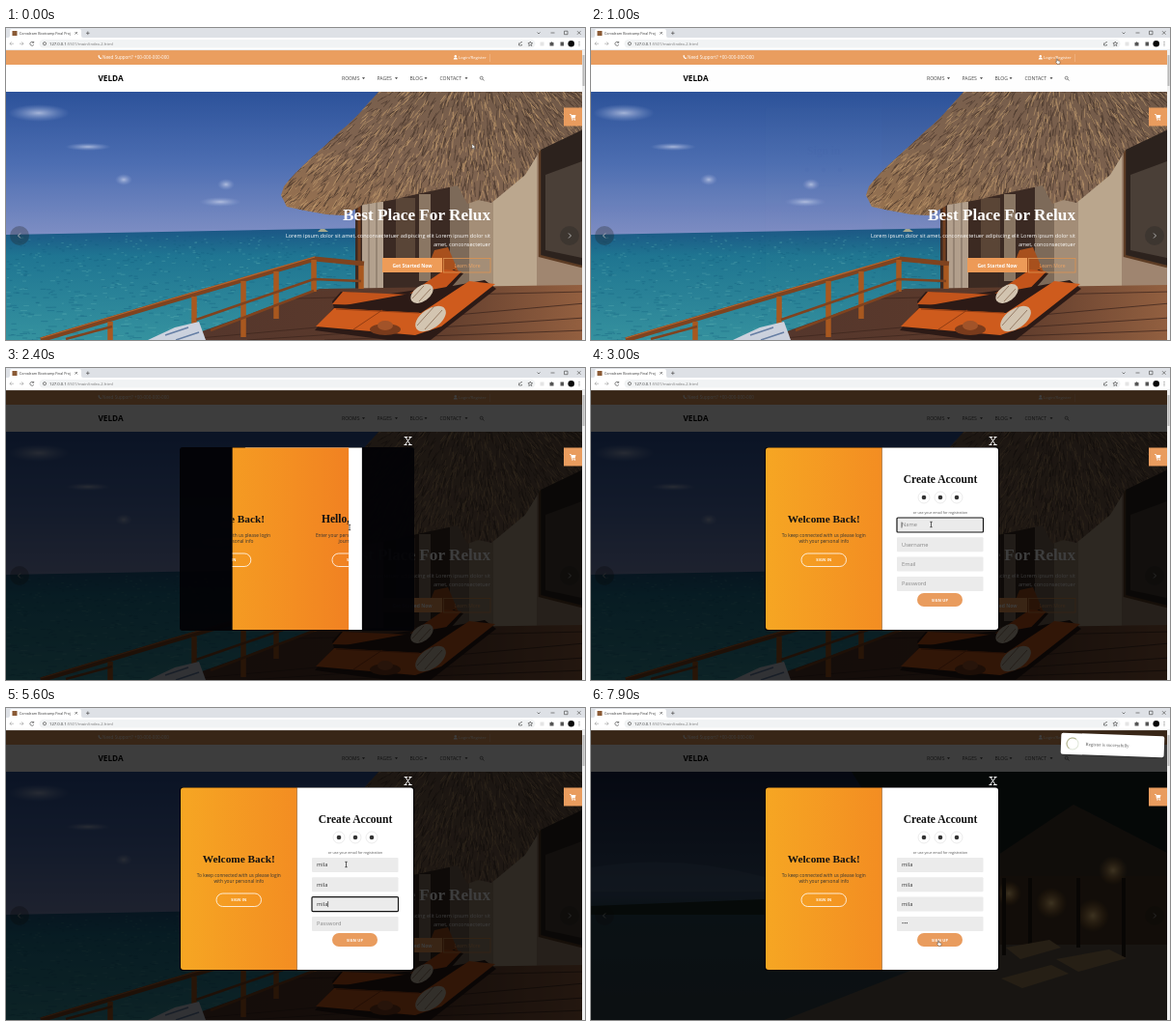
An HTML page that plays this animation: 600 px wide and 323 px high, repeating every 8 s.

```html
<!DOCTYPE html>
<html lang="en">
<head>
<meta charset="utf-8">
<title>Hotel sign-up</title>
<style>
html, body { margin: 0; width: 100%; height: 100%; overflow: hidden; background: #fff }
svg { display: block; width: 600px; height: 323px }
text { font-family: "Open Sans", Arial, sans-serif; font-size: 5px; fill: #333 }
.serif { font-family: "Liberation Serif", Times, serif; font-weight: 700 }
.mid { text-anchor: middle }
.end { text-anchor: end }
.w { fill: #fff }
.h { font-size: 11.6px; fill: #111 }
.nav { font-size: 5.1px; fill: #444 }
.lead { font-size: 5.55px }
.note { font-size: 4.8px }
.small { font-size: 3.7px; fill: #555 }
.btn { font-size: 3.9px; font-weight: 700; letter-spacing: .2px; fill: #fff; text-anchor: middle }
.line { fill: none; stroke: #555; stroke-width: .7 }
.in { font-size: 5.7px; fill: #333 }
.hint { fill: #888 }
</style>
</head>
<body>
<svg viewBox="0 0 600 323">
<defs>
  <linearGradient id="sky" x2="0" y2="1"><stop stop-color="#2c529a"/><stop offset=".5" stop-color="#4d6eb2"/><stop offset="1" stop-color="#7f8fc4"/></linearGradient>
  <linearGradient id="sea" x2="0" y2="1"><stop stop-color="#1b5585"/><stop offset=".25" stop-color="#1f7592"/><stop offset="1" stop-color="#35929f"/></linearGradient>
  <linearGradient id="straw" x1="1" x2="0" y2="1"><stop stop-color="#6f5847"/><stop offset=".6" stop-color="#806450"/><stop offset="1" stop-color="#9a7350"/></linearGradient>
  <linearGradient id="deck"><stop stop-color="#54362c"/><stop offset=".6" stop-color="#5c3a2b"/><stop offset="1" stop-color="#946040"/></linearGradient>
  <linearGradient id="dusk" x2="0" y2="1"><stop stop-color="#18254a"/><stop offset=".5" stop-color="#3c5675"/><stop offset=".56" stop-color="#2b4858"/><stop offset="1" stop-color="#33434a"/></linearGradient>
  <linearGradient id="orange"><stop stop-color="#f6a623"/><stop offset=".5" stop-color="#f38d22"/><stop offset="1" stop-color="#ee7322"/></linearGradient>
  <radialGradient id="lamp"><stop stop-color="#ffd68a"/><stop offset="1" stop-color="#c78236" stop-opacity="0"/></radialGradient>
  <radialGradient id="cloud"><stop stop-color="#cbd3ea"/><stop offset="1" stop-color="#8fa3d2" stop-opacity="0"/></radialGradient>
  <clipPath id="hero"><path d="M0 66H597V323H0Z"/></clipPath>
  <clipPath id="roofClip"><path id="roof" d="M386 66C372 82 360 96 346 107C326 127 304 143 288 164L285 173L291 185L310 189L332 193L350 194L370 183L400 178L430 171L468 163L478 182L490 178L503 181L520 167L538 152L554 126L598 105V66Z"/></clipPath>
  <clipPath id="box"><rect x="181" y="82.500" width="241" height="188.500" rx="3"/></clipPath>
  <clipPath id="window"><rect id="slot" y="82" width="120.500" height="190"/></clipPath>
</defs>

<g clip-path="url(#hero)">
  <rect y="66" width="600" height="150" fill="url(#sky)"/>
  <g fill="url(#cloud)" opacity=".75"><ellipse cx="34" cy="88" rx="32" ry="9"/><ellipse cx="85" cy="123" rx="24" ry="4"/><ellipse cx="122" cy="157" rx="9" ry="6"/><ellipse cx="228" cy="162" rx="9" ry="6"/><ellipse cx="222" cy="180" rx="22" ry="5"/></g>
  <path d="M0 214L380 207V323H0Z" fill="url(#sea)"/>
  <g fill="none" stroke-width=".7" opacity=".5"><path id="wave1" stroke="#115a7c"/><path id="wave2" stroke="#5cb0b4"/></g>
  <path d="M323 211l3-3h4l4 3z" fill="#a5a88f"/>
  <path d="M362 150H600V280H362Z" fill="#3b2a23"/>
  <path d="M369 180H391V270H369Z" fill="#b3a18e"/>
  <path d="M376 180v90M384 180v90" stroke="#8d7c6c" stroke-width="1.500"/>
  <path d="M404 176h20v70h-20z" fill="#594537"/>
  <path d="M428 172H440V262H428Z" fill="#8a7663"/>
  <path d="M460 160H480V268H460Z" fill="#7d6a59"/>
  <path d="M480 145L556 120V276H480Z" fill="#a48e77"/>
  <path d="M505 155L553 130V278H505Z" fill="#bba78e"/>
  <path d="M550 120L600 92V300H550Z" fill="#a08670"/>
  <path d="M553 124L597 104V247L553 236Z" fill="#2c221d"/>
  <path d="M559 152L597 138V238L559 230Z" fill="#4a3f37"/>
  <path d="M553 124V236L597 247" stroke="#5e3d25" stroke-width="2.500" fill="none"/>
  <path d="M366 185v58" stroke="#713f20" stroke-width="3"/>
  <path d="M178 323L325 270L600 266V323Z" fill="url(#deck)"/>
  <path d="M178 323L600 285M250 323L600 300M330 323L600 313M300 280L600 273" stroke="#3f271f" stroke-width=".8"/>
  <use href="#roof" fill="url(#straw)"/>
  <g clip-path="url(#roofClip)" fill="none" stroke-width=".6"><path id="straw1" stroke="#46342a"/><path id="straw2" stroke="#c19a6d"/></g>
  <g fill="none" stroke="#7f431f">
    <path d="M36 323L166 284L320 239L371 244" stroke-width="5"/>
    <path d="M36 321L166 282L320 237" stroke="#b5652f" stroke-width="1.300"/>
    <path d="M108 304v19M195 278v34M246 262v58M280 252v49M319 240v33M368 246v24" stroke="#a9581f" stroke-width="5.500"/>
    <path d="M197 302L319 260L368 262M212 313L319 272M62 322L110 309" stroke-width="2.500"/>
  </g>
  <path d="M147 323l28-13 25-6 7 19z" fill="#ccd2de"/>
  <path d="M165 318l24-8M176 323l24-8" stroke="#667fa5" stroke-width="1.500"/>
  <path d="M436 250l8-20 14-3 12 28z" fill="#a8501d"/>
  <path d="M347 273L392 276L433 270L464 250L474 254L440 293L340 290L338 283Z" fill="#2c1a16"/>
  <path d="M349 273L417 276L455 250L472 252L436 289L338 286Z" fill="#c4541b"/>
  <path d="M340 289L320 313L395 323H440L508 270L496 261Z" fill="#2c1a16"/>
  <path d="M340 290L430 295L480 262L507 265L451 309L424 318L321 309Z" fill="#cf5b1d"/>
  <path d="M342 291l86 4M390 292l-30 20" stroke="#933d13" fill="none"/>
  <g fill="#d3c5b1"><ellipse cx="431" cy="275" rx="13" ry="8" transform="rotate(-35 431 275)"/><ellipse cx="440" cy="301" rx="18" ry="10" transform="rotate(-35 440 301)"/></g>
  <path d="M421 280l12-13M428 283l12-13M426 308l18-20M434 312l18-20" stroke="#987d66"/>
  <ellipse cx="393" cy="312" rx="16" ry="6" fill="#7a3b1c"/><ellipse cx="393" cy="308" rx="8" ry="5" fill="#a25329"/>
  <g id="copy">
    <text class="serif w end" x="502" y="199" style="font-size:17.200px">Best Place For Relux</text>
    <text class="lead w end" x="502" y="216.500">Lorem ipsum dolor sit amet, conconsectetuer adipiscing elit Lorem ipsum dolor sit</text>
    <text class="lead w end" x="502" y="225.500">amet, conconsectetuer</text>
    <rect x="390" y="238" width="62" height="15" fill="#ee9c58"/>
    <text class="w mid" x="421" y="247.500" font-weight="700">Get Started Now</text>
    <rect x="453.500" y="238.500" width="48.500" height="14.500" fill="none" stroke="#dc9352" stroke-width=".8"/>
    <text class="mid" x="478" y="247.500" style="fill:#eda566">Learn More</text>
  </g>
  <g id="night">
    <rect y="66" width="600" height="257" fill="url(#dusk)"/>
    <path d="M0 165Q90 150 180 175L300 190H0Z" fill="#62789a" opacity=".3"/>
    <path d="M0 205L180 198L300 214H0Z" fill="#182924"/>
    <path d="M270 66H597V240H380Z" fill="#17201f"/>
    <path d="M410 160L500 100L597 150V178L410 176Z" fill="#43382c"/>
    <path d="M422 174H597V250H422Z" fill="#4c3824"/>
    <path d="M200 323L400 245H597V323Z" fill="#645a4b"/>
    <g fill="url(#lamp)"><circle cx="433" cy="192" r="13"/><circle cx="477" cy="202" r="16"/><circle cx="541" cy="168" r="15"/><circle cx="520" cy="215" r="17"/></g>
    <path d="M428 176v80M455 176v72M505 176v72M552 176v82" stroke="#22180f" stroke-width="4"/>
    <path d="M430 248l45-8 12 8-42 12zM482 260l55-10 18 9-50 14zM425 280l52-14 18 9-48 15z" fill="#a18158"/>
  </g>
  <g fill="#222" opacity=".3"><circle cx="14" cy="215" r="10"/><circle cx="584" cy="215" r="10"/></g>
  <path d="M15 212.500l-2.500 2.500 2.500 2.500M583 212.500l2.500 2.500-2.500 2.500" fill="none" stroke="#ccc" stroke-width=".8"/>
</g>

<rect y="23" width="597" height="15" fill="#ea9e5f"/>
<path d="M95.500 28.500l1-.4.700 1.100-.5.600.9 1 .8-.4.700 1-.6.700c-1.500.2-3.200-1.900-3-3.600z" fill="#fff"/>
<text class="w" x="100" y="32.300" style="font-size:4.600px">Need Support? +00-000-000-000</text>
<circle cx="465.800" cy="29.300" r="1.200" fill="#fff"/><path d="M463.700 32.500q0-2 2.100-2t2.100 2z" fill="#fff"/>
<text class="w" x="469" y="32.200" style="font-size:4.300px">Login/Register</text>
<path d="M501.500 27v8" stroke="#f1bd91" stroke-width=".6"/>
<rect y="38" width="597" height="28" fill="#fff"/>
<rect id="searchBox" x="485" y="38" width="17" height="28" fill="#f8f8f8"/>
<text x="95.500" y="55.200" style="font-size:8.200px;font-weight:700;fill:#050505">VELDA</text>
<g id="menu"></g>
<circle class="line" cx="492.700" cy="51.700" r="1.500"/><path class="line" d="M493.800 52.800l1.600 1.700"/>

<rect id="shade" y="23" width="597" height="300"/>
<g id="modal">
  <path d="M414 71.500l5 8M419.500 71.500l-6 8M412.700 71.500h3.500M417.500 71.500h3M412.500 79.500h3M417 79.500h3.700" stroke="#fff" stroke-width="1"/>
  <rect x="180" y="82" width="243" height="190" rx="3" fill="#030306" opacity=".94"/>
  <g clip-path="url(#box)">
    <g id="login">
      <rect x="181" y="82" width="121" height="190" fill="#fff"/>
      <text class="serif h mid" x="241.300" y="131">Sign in</text>
      <g class="social" transform="translate(241 147)"></g>
      <text class="small mid" x="241" y="163.500">or use your account</text>
      <path d="M197 168h89v15h-89zM197 188h89v15h-89z" fill="#ebebeb"/>
      <text class="in hint" x="201" y="177.300">Username</text>
      <text class="in hint" x="201" y="197.300">Password</text>
      <text class="mid" x="241" y="214.500" style="font-size:4.700px">Forgot your password?</text>
      <rect x="218" y="221" width="46.500" height="14" rx="7" fill="#e99c5e"/><text class="btn" x="241.300" y="229.500">SIGN IN</text>
    </g>
    <g id="signup">
      <rect x="301.500" y="82" width="121" height="190" fill="#fff"/>
      <text class="serif h mid" x="362" y="119">Create Account</text>
      <g class="social" transform="translate(362 134)"></g>
      <text class="small mid" x="362" y="151.200">or use your email for registration</text>
      <g id="fields"></g>
      <rect x="338" y="233" width="47" height="14" rx="7" fill="#e99c5e"/><text class="btn" x="361.500" y="241.500">SIGN UP</text>
    </g>
    <g clip-path="url(#window)">
      <rect x="181" y="82" width="241" height="190" fill="url(#orange)"/>
      <g id="welcome">
        <text class="serif h mid" x="241.300" y="160" style="font-size:11.300px">Welcome Back!</text>
        <text class="note mid" x="241.300" y="174.500">To keep connected with us please login</text>
        <text class="note mid" x="241.300" y="181">with your personal info</text>
        <rect x="218" y="192" width="46.500" height="13.500" rx="6.700" fill="none" stroke="#fff" stroke-width=".8"/><text class="btn" x="241.300" y="200.200">SIGN IN</text>
      </g>
      <text class="serif h mid" x="361.700" y="160">Hello, Friend!</text>
      <text class="note mid" x="361.700" y="174.500">Enter your personal details and start</text>
      <text class="note mid" x="361.700" y="181">journey with us</text>
      <rect x="338" y="192" width="47" height="13.500" rx="6.700" fill="none" stroke="#fff" stroke-width=".8"/><text class="btn" x="361.500" y="200.200">SIGN UP</text>
    </g>
  </g>
</g>

<rect x="578" y="82.500" width="19" height="19" fill="#e99c5e"/>
<path d="M584 89.500h1.500l1 4.500h3.500" fill="none" stroke="#fff" stroke-width=".8"/><path d="M585.800 90h4.700l-.7 3h-3.400z" fill="#fff"/><circle cx="587" cy="95" r=".7" fill="#fff"/><circle cx="589.500" cy="95" r=".7" fill="#fff"/>

<rect width="600" height="23" fill="#fff"/>
<path d="M0 0H600V10H0Z" fill="#dee1e6"/>
<path d="M2 10q2 0 2-2V3q0-2 2-2h70q2 0 2 2v5q0 2 2 2z" fill="#fff"/>
<rect x="6.500" y="3" width="5" height="5" fill="#8a5a35"/>
<text x="14" y="7" style="font-size:3.600px">Corvalearn Bootcamp Final Proj</text>
<path class="line" d="M71.500 4l2.500 2.500M74 4l-2.500 2.500M83 5.300h3.600M84.800 3.500v3.600M550.500 4.500l1.500 1.500 1.500-1.500M564.500 5h4M578.500 3.200h3.500v3.500h-3.500zM592 3.200l3.500 3.500M595.500 3.200L592 6.700"/>
<rect x="34.500" y="12" width="514" height="8.500" rx="4.200" fill="#f1f3f4"/>
<path class="line" opacity=".5" d="M8 16.200H4M5.700 14.400L4 16.200l1.700 1.800M14 16.200h4M16.300 14.400l1.700 1.800-1.700 1.800"/>
<path class="line" d="M28.500 15a2 2 0 1 0 .3 2M28.700 13.800v1.500h-1.500"/>
<circle class="line" cx="40" cy="16.200" r="1.600"/>
<text x="45" y="17.700" style="font-size:4.200px">127.0.0.1<tspan fill="#777">:5501/main/index-2.html</tspan></text>
<path class="line" d="M531.500 15.500v2.500h3v-1M532.500 16.500q0-2 2.500-2M543.300 14l.7 1.500 1.700.2-1.300 1.100.4 1.700-1.500-.9-1.500.9.4-1.700-1.300-1.100 1.700-.2z"/>
<rect x="553.500" y="14.500" width="4" height="4" fill="#e5e5e5"/>
<path d="M563.500 15h1.200a.8.800 0 0 1 1.600 0h1.200v3.500h-4zM574.500 14.500h3.500v4h-3.500z" fill="#555"/>
<circle cx="585.700" cy="16.200" r="3.300" fill="#080808"/>
<g fill="#555"><circle cx="594" cy="14.500" r=".5"/><circle cx="594" cy="16.200" r=".5"/><circle cx="594" cy="17.900" r=".5"/></g>
<path d="M0 22.700H600" stroke="#d9dbde" stroke-width=".6"/>
<path d="M597 23h3v300h-3z" fill="#f0f0f0"/><path d="M597.500 28h2v32h-2z" fill="#b9b9b9"/>

<g id="toast">
  <rect x="-53" y="-10" width="107" height="22" rx="2" fill="#000" opacity=".25"/>
  <rect x="-53.500" y="-11" width="107" height="22" rx="2" fill="#fff"/>
  <circle cx="-41.500" r="6" fill="none" stroke="#dfe6d8" stroke-width="1"/>
  <path id="arc" d="M-41.500-6a6 6 0 0 1 0 12" fill="none" stroke="#b5b48e" stroke-width="1"/>
  <path id="tick" d="M-44.500 0l2 2.300 4.200-4.500" fill="none" stroke="#8fb869" stroke-width="1.200"/>
  <text class="serif" x="-28" y="1.500" style="font-size:4.800px;font-weight:400;fill:#555">Register is successfully</text>
</g>
<g id="cursor">
  <path d="M0 0v5l1.200-1.100.8 1.800.8-.4-.8-1.700h1.600z" fill="#fff" stroke="#222" stroke-width=".4"/>
  <path d="M-1.200-2.700H1.200M0-2.700V2.700M-1.200 2.700H1.200" stroke="#222" stroke-width=".7"/>
  <path d="M-.6 0q.7-.8 1.200 0v1.900l2 .4q.6.200.5.800l-.4 2.200h-2.600l-1.600-2.200q.2-.7.900-.2z" fill="#fff" stroke="#222" stroke-width=".4"/>
</g>
</svg>
<script>
const LOOP = 8000, $ = id => document.getElementById(id);
const set = (el, attrs) => { for (const k in attrs) el.setAttribute(k, attrs[k]); };
const clamp = v => Math.min(1, Math.max(0, v));
const ramp = (t, from, to) => clamp((t - from) / (to - from));
const ease = u => .5 - .5 * Math.cos(Math.PI * u);
const show = (el, on) => set(el, {visibility: on ? 'visible' : 'hidden'});

// Eased keyframes: each row is [time, ...values].
function track(rows, t) {
  let i = 0;
  while (i < rows.length - 2 && t > rows[i + 1][0]) i++;
  const a = rows[i], b = rows[i + 1], u = ease(ramp(t, a[0], b[0]));
  return a.slice(1).map((v, k) => v + (b[k + 1] - v) * u);
}

let seed = 7;
const rnd = () => (seed = seed * 16807 % 2147483647) / 2147483647;
function thatch(n) {
  let d = '';
  while (n--) {
    const x = 280 + 320 * rnd(), y = 60 + 132 * rnd(), len = 4 + 8 * rnd();
    const a = Math.atan2(y + 10, x - 490) + (rnd() - .5) * .6;
    d += `M${x} ${y}l${len * Math.cos(a)} ${len * Math.sin(a)}`;
  }
  return d;
}
function ripples(n) {
  let d = '';
  while (n--) {
    const near = rnd();
    d += `M${360 * rnd()} ${215 + 108 * near}h${2 + 8 * near * rnd()}`;
  }
  return d;
}
set($('straw1'), {d: thatch(1500)});
set($('straw2'), {d: thatch(1100)});
set($('wave1'), {d: ripples(500)});
set($('wave2'), {d: ripples(350)});

$('menu').innerHTML = [['ROOMS', 348], ['PAGES', 384.5], ['BLOG', 418.5], ['CONTACT', 449.5]].map(([s, x], i) =>
  `<text class="nav" x="${x}" y="53.800">${s}</text><path d="M${[369, 403, 433.5, 475.5][i]} 51.300h3l-1.500 1.700z" fill="#333"/>`).join('');
document.querySelectorAll('.social').forEach(g => g.innerHTML = [-17, 0, 17].map(x =>
  `<circle cx="${x}" r="6" fill="#fff" stroke="#ddd" stroke-width=".6"/><circle cx="${x}" r="2.300" fill="#333"/>`).join(''));

const fields = [
  {hint: 'Name', y: 155, focus: 2900, type: 3250, value: 'mila'},
  {hint: 'Username', y: 175.3, focus: 3950, type: 4300, value: 'mila'},
  {hint: 'Email', y: 195.6, focus: 4900, type: 5200, value: 'mila'},
  {hint: 'Password', y: 216, focus: 5850, type: 6050, value: '•••'}
];
$('fields').innerHTML = fields.map(f =>
  `<g><rect x="317" y="${f.y}" width="89.500" height="15" rx="1" fill="#ebebeb"/><text class="in" x="322" y="${f.y + 9.4}"></text><path d="M0 ${f.y + 4.5}v6" stroke="#111" stroke-width=".6"/></g>`).join('');
fields.forEach((f, i) => {
  [f.box, f.text, f.caret] = $('fields').children[i].children;
  f.blur = i < 3 ? fields[i + 1].focus : 7100;
});

function drawField(f, t) {
  const count = Math.min(f.value.length, Math.max(0, Math.floor((t - f.type) / 90) + 1));
  const active = t >= f.focus && t < f.blur;
  const lastKey = count ? f.type + 90 * (count - 1) : f.focus;
  f.text.textContent = count ? f.value.slice(0, count) : f.hint;
  f.text.setAttribute('class', count ? 'in' : 'in hint');
  set(f.box, {stroke: active ? '#151515' : 'none', 'stroke-width': 1.2});
  const x = 322 + (count ? f.text.getComputedTextLength() + .3 : 0);
  set(f.caret, {transform: `translate(${x} 0)`, opacity: active && (t - lastKey) % 1000 < 500 ? 1 : 0});
}

const pointer = [[0, 483, 120], [550, 485, 36], [1000, 483, 32], [1100, 483, 32], [1500, 351, 187], [1800, 352, 198],
  [2100, 352, 198], [2400, 356, 165], [2750, 352.5, 162], [6450, 352.5, 162], [7000, 360, 241], [8000, 360, 241]];
const toastPose = [[7570, -5, 2], [7735, 0, -2], [7900, 2, 2], [8070, 0, 0]];

function draw(t) {
  show($('searchBox'), t > 350 && t < 900);
  const open = ramp(t, 1000, 1250), night = ramp(t, 5700, 6250);
  set($('shade'), {opacity: .76 * open});
  set($('modal'), {opacity: open});
  set($('night'), {opacity: night});
  set($('copy'), {opacity: 1 - night});

  const p = ease(ramp(t, 2080, 2680)), shift = 120.5 * p;
  set($('slot'), {x: 301.5 - shift});
  set($('login'), {transform: `translate(${shift} 0)`});
  set($('signup'), {transform: `translate(${shift - 120.5} 0)`});
  show($('login'), p < .6);
  show($('signup'), p >= .6);
  set($('welcome'), {transform: `translate(${-24.1 * (1 - p)} 0)`});
  fields.forEach(f => drawField(f, t));

  const [dy, turn] = track(toastPose, t);
  show($('toast'), t >= 7570);
  set($('toast'), {transform: `translate(540.5 ${36.5 + dy}) rotate(${turn})`});
  set($('arc'), {transform: `rotate(${-360 * ramp(t, 7780, 8080)} -41.5 0)`});
  set($('tick'), {opacity: t > 7975 ? 1 : 0});

  const [x, y] = track(pointer, t);
  const hand = t > 480 && t < 1150 || t > 1620 && t < 2200 || t > 6850;
  const kind = hand ? 2 : t > 2300 && t < 6500 ? 1 : 0;
  set($('cursor'), {transform: `translate(${x} ${y})`});
  [...$('cursor').children].forEach((c, i) => c.style.display = i === kind ? '' : 'none');
}

const start = performance.now();
(function tick() {
  draw((performance.now() - start) % LOOP);
  requestAnimationFrame(tick);
})();
</script>
</body>
</html>
```
